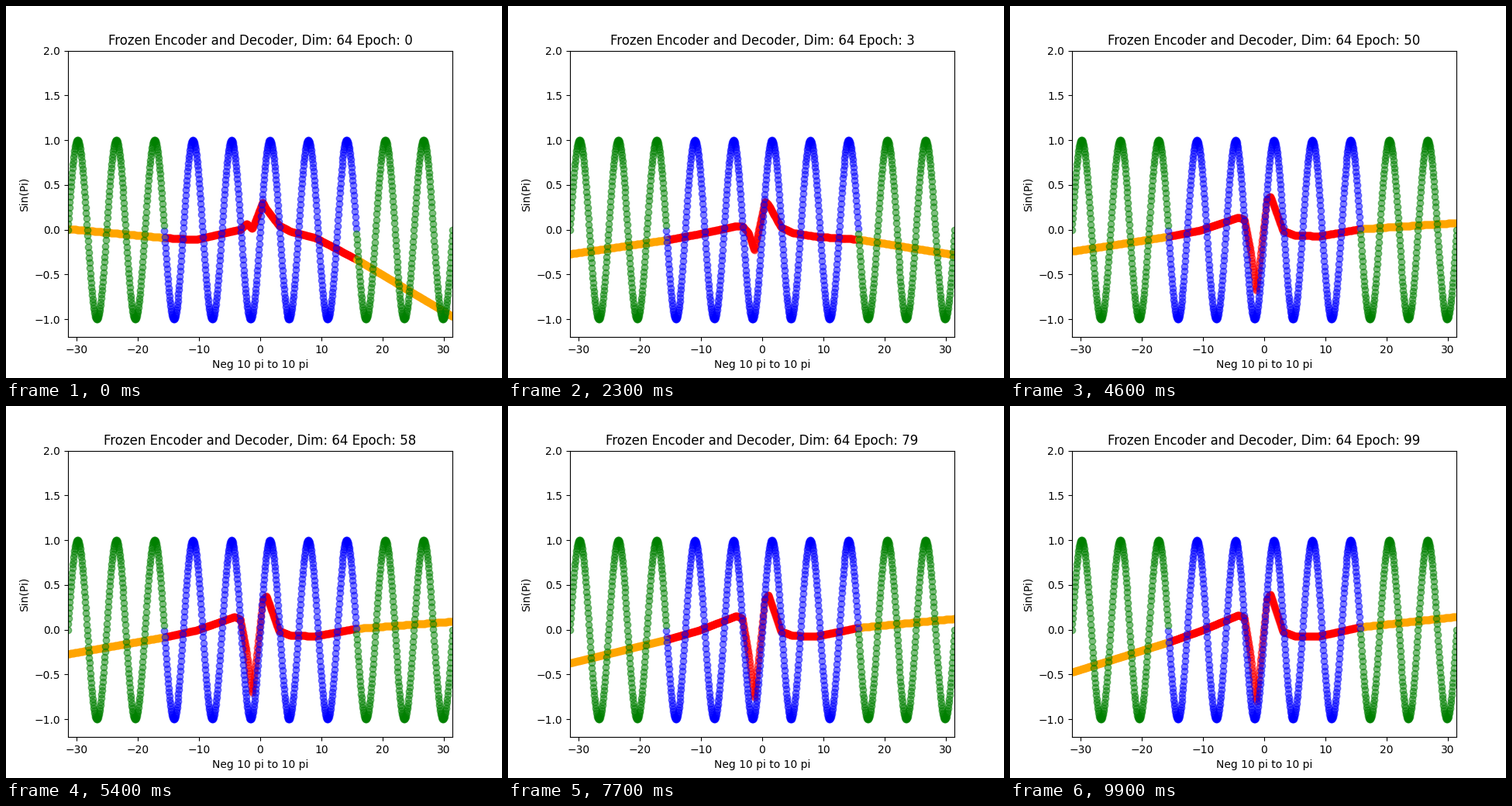
Write a matplotlib script that moves like this. It is 640 by 480 pixels and loops after 10 s.

```python
import numpy as np
import matplotlib.pyplot as plt
from matplotlib.animation import FuncAnimation

EPOCHS = 100
LIMIT = 10 * np.pi

# Bends of the fitted curve: x, untrained y, trained y.
BENDS = np.array([
    (-LIMIT, 0.01, -0.475),
    (-LIMIT / 2, -0.09, -0.14),
    (-10.5, -0.11, -0.015),
    (-4.2, -0.01, 0.165),
    (-3.2, 0.0, 0.13),
    (-2.2, 0.07, -0.29),
    (-1.3, 0.01, -0.805),
    (0.4, 0.31, 0.33),
    (1.0, 0.23, 0.4),
    (3, 0.05, -0.02),
    (5, -0.02, -0.07),
    (9, -0.09, -0.07),
    (LIMIT / 2, -0.33, 0.03),
    (LIMIT, -0.97, 0.145),
])

x = np.linspace(-LIMIT, LIMIT, 1000)
inner = np.abs(x) < LIMIT / 2
# Saved plots are played back in file-name order: 0, 1, 10, 11, ...
order = sorted(range(EPOCHS), key=str)


def predict(epoch):
    """Training progress is logarithmic; the outer parts settle first."""
    p = np.log1p(epoch) / np.log(EPOCHS)
    bend_x, first, trained = BENDS.T
    pace = np.where(np.abs(bend_x) > 5, p ** 0.4, p)
    y = first + (trained - first) * pace
    # The left tail is lifted for a while in mid-training.
    lift = 0.22 * np.sin(np.pi * p ** 3)
    y += lift * np.clip((-9 - bend_x) / (LIMIT - 9), 0, 1)
    return np.interp(x, bend_x, y)


fig, ax = plt.subplots(figsize=(6.4, 4.8), dpi=100)


def dots(mask, y, color):
    return ax.scatter(x[mask], y[mask], c=color, alpha=0.5)


wave = np.sin(x)
start = predict(0)
fit_in = dots(inner, start, "red")
fit_out = dots(~inner, start, "orange")
dots(inner, wave, "blue")
dots(~inner, wave, "green")

ax.set_xlim(-LIMIT, LIMIT)
ax.set_ylim(-1.2, 2)
ax.set_xlabel("Neg 10 pi to 10 pi")
ax.set_ylabel("Sin(Pi)")
title = ax.set_title("", pad=5.3)


def update(i):
    epoch = order[i]
    y = predict(epoch)
    fit_in.set_offsets(np.c_[x, y][inner])
    fit_out.set_offsets(np.c_[x, y][~inner])
    title.set_text(f"Frozen Encoder and Decoder, Dim: 64 Epoch: {epoch}")
    return fit_in, fit_out, title


anim = FuncAnimation(fig, update, frames=EPOCHS, interval=100,
                     repeat=True, repeat_delay=0)
plt.show()
```
